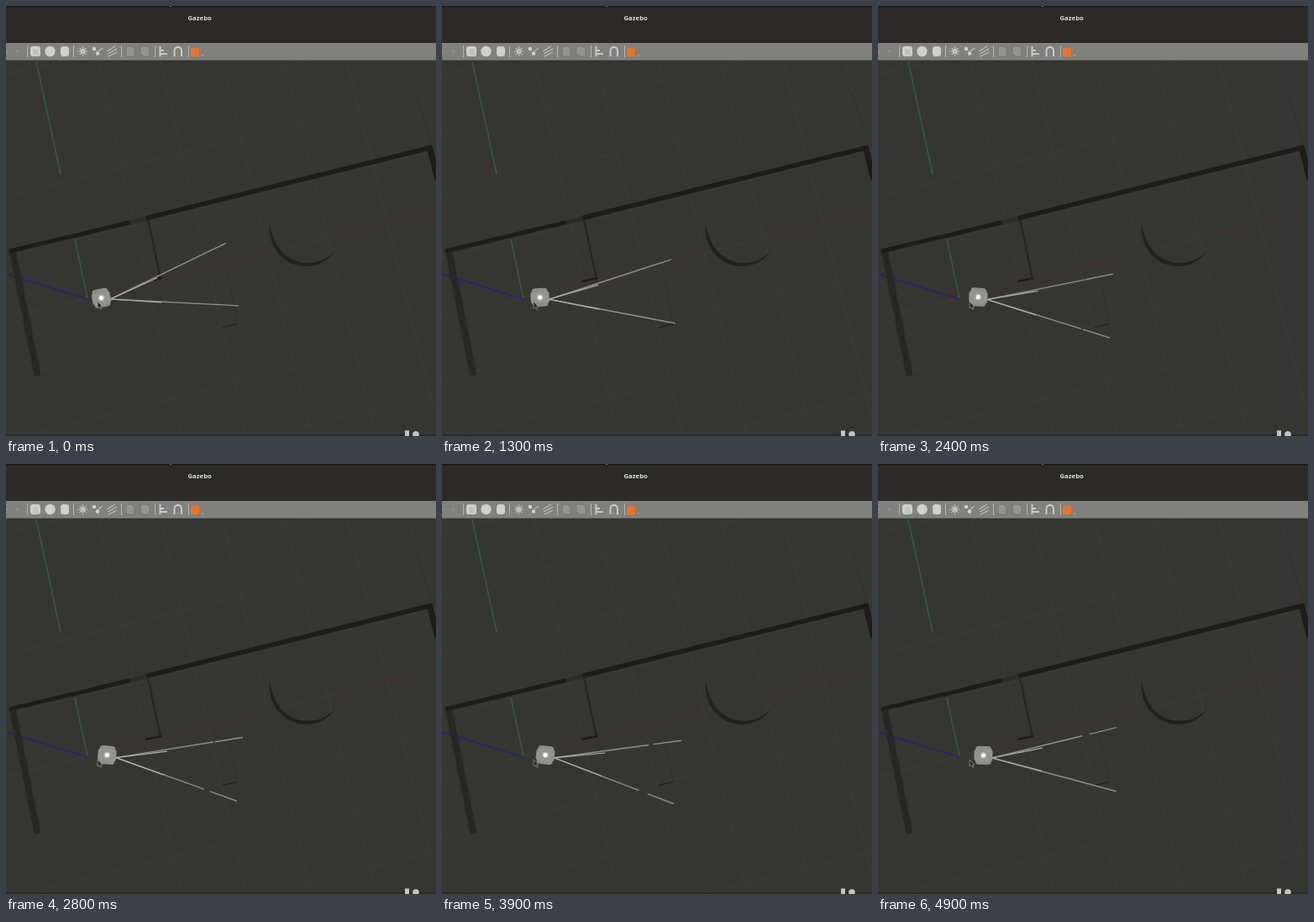
Write an HTML page that moves like this. It is 512 px wide and 512 px high and loops after 5 s.

```html
<!DOCTYPE html>
<html lang="en">
<head>
<meta charset="utf-8">
<style>
html, body { margin: 0; height: 100%; overflow: hidden; background: #353532; }
svg { display: block; width: 100vw; height: 100vh; }
text { font: bold 7.8px "Open Sans", "Noto Sans", sans-serif; fill: #dcdcd8; }
</style>
</head>
<body>
<svg viewBox="0 0 512 512" fill="none">
  <rect width="512" height="512" fill="#353532"/>

  <!-- floor grid and axes -->
  <path id="grid" stroke="#3d3d3a" opacity=".8"/>
  <path d="M488 102L507 166" stroke="#2c2c2a"/>
  <path d="M130 340L316 293M392 274L512 244" stroke="#4b302c" stroke-width="1.2"/>
  <path d="M36 66L65 200M82 278L97 348" stroke="#3c573b" stroke-width="1.8"/>
  <path d="M0 319L97 349" stroke="#25246a" stroke-width="1.8"/>

  <!-- walls -->
  <g stroke="#1d1c1a">
    <path d="M8 292L37.5 440" stroke="#272725" stroke-width="8"/>
    <path d="M4 292L148 257.500" stroke-width="5"/>
    <path d="M148 257.500L167 253" stroke="#2c2c29" stroke-width="5"/>
    <path d="M167 252.500L506 168.500" stroke-width="5.600"/>
    <path d="M504 166.500L514 207" stroke-width="7"/>
    <path d="M169 254L184 325" stroke="#252523" stroke-width="2.500"/>
    <path d="M166 328L185.500 324" stroke-width="2.600"/>
    <path d="M258 382.500L275 378.500" stroke="#242421" stroke-width="1.400"/>
    <path d="M264 320L275 378" stroke="#2f2f2c"/>
  </g>
  <path d="M314 260C311 285 330 310 357 310C372 310 384 303 392 292C380 303 370 306 358 306C335 305 319 288 314 260Z" fill="#21211f"/>

  <path id="far" stroke="#8e8e8a" stroke-width="1.400"/>
  <path id="near" stroke="#b0b0ac" stroke-width="1.200"/>
  <g id="robot">
    <rect x="-9.500" y="-11" width="19" height="22" rx="4" fill="#8d8d8a"/>
    <rect x="-11" y="-7" width="22" height="14" rx="3" fill="#939390"/>
    <circle r="4" fill="#aeaeab"/>
    <circle r="2.500" fill="#fff"/>
  </g>
  <path d="M109 352V360L111 358.500L112.500 361.500L114 360.500L112.500 358H115Z" fill="#2a2a28" stroke="#8c8c88" stroke-width=".8"/>

  <!-- title and tool bar -->
  <rect width="512" height="44" fill="#2b2a28"/>
  <rect width="512" height="1.500" fill="#191917"/>
  <path d="M195 .5H197" stroke="#777774"/>
  <text x="230.700" y="17.300" text-anchor="middle">Gazebo</text>
  <rect y="44" width="512" height="20" fill="#80807d"/>
  <path d="M0 64.500H512" stroke="#62625f"/>
  <path id="bars" stroke="#b4b4b0"/>
  <path d="M0 54H2M12 54H15" stroke="#a0a09c"/>
  <g fill="#d0d0cc">
    <rect x="29" y="48" width="12" height="12" rx="3"/>
    <rect x="32.500" y="51.500" width="6" height="7" fill="#c0c0bc"/>
    <circle cx="52.500" cy="54" r="6.200"/>
    <rect x="65" y="48" width="10" height="12" rx="3.500"/>
    <circle cx="91.500" cy="54" r="3"/>
    <circle cx="105" cy="51" r="2.300"/>
    <circle cx="109" cy="56.500" r="2.300"/>
  </g>
  <g stroke="#bcbcb8" stroke-width="1.200">
    <path d="M91.500 48V60M85.500 54H97.500M87.500 50L95.500 58M95.500 50L87.500 58"/>
    <path d="M110 54L115 50M120 54L130 48M121 57L132 51M122 60L132 55"/>
  </g>
  <path d="M143 48H150L153 51V60H145L143 58ZM160 48H168L171 51V60H164L160 57Z" fill="#949490" stroke="#737370"/>
  <path d="M183.500 48V60M184 53H188M184 57H192M200.500 60V53C200.500 47.500 209 47.500 209 53V60" stroke="#cacac6" stroke-width="2"/>
  <rect x="220" y="50" width="10" height="10.500" rx="1.500" fill="#e27630"/>
  <path d="M222 49H232V57" stroke="#a77a5c"/>
  <path d="M233 59H235" stroke="#b0b0ac"/>

  <path d="M0 511H512" stroke="#292927" stroke-width="2"/>
  <rect x="475" y="505.500" width="5" height="7" fill="#c4c4c0"/>
  <circle cx="488" cy="510" r="3.800" fill="#c4c4c0"/>
</svg>
<script>
const el = id => document.getElementById(id);
const set = (id, name, value) => el(id).setAttribute(name, value);

let grid = "";
for (let i = 1; i < 7; i++) grid += `M${36 + 74 * i} 66L${132.5 + 77 * i} 512`;
for (let y = 82; y < 680; y += 72.5) grid += `M0 ${y}L512 ${y - 128}`;
set("grid", "d", grid);
set("bars", "d", [25, 80, 137, 177, 217].map(x => `M${x}.5 47V61`).join(""));

const reach = 153, spread = 14.4;

function draw(now) {
  const t = Math.floor(now % 5000 / 100) / 10;   // seconds, ten steps each
  const p = t / 4.9;
  const x = 124.3 + 11.5 * p, y = 349 + p;
  const heading = 9.3 - 6 * Math.abs(t - 3.46);  // turns right, then back at an even rate

  const point = (angle, part) => {
    const a = angle * Math.PI / 180;
    return `${x + reach * part * Math.cos(a)} ${y + reach * part * Math.sin(a)}`;
  };
  const line = (angle, from, to) => `M${point(angle, from)}L${point(angle, to)}`;
  const ray = (angle, gap) => line(angle, 0, .78 - gap) + line(angle, .78, 1);

  const left = heading - spread, right = heading + spread;
  const leftGap = .11 * Math.max(0, p - .47);
  const rightGap = .016 * Math.max(0, right - 16.5);
  set("far", "d", ray(left, leftGap) + ray(right, rightGap));
  set("near", "d", line(left + 1.5 + p, 0, .4) + line(right + .7 - p, 0, .4));
  set("robot", "transform", `translate(${113.5 + 12 * p} ${347.7 - 1.2 * Math.sin(p * 2.4)}) rotate(${heading})`);
  requestAnimationFrame(draw);
}
requestAnimationFrame(draw);
</script>
</body>
</html>
```
